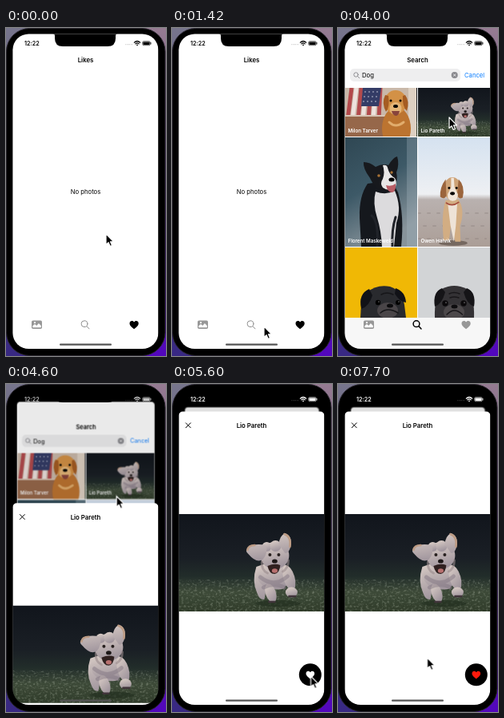
An HTML page for the animation above (8000 ms loop, 200 by 411 pixels).

```html
<!DOCTYPE html>
<html lang="en">
<head>
<meta charset="utf-8">
<title>Photo likes</title>
<style>
html, body { margin: 0; width: 100%; height: 100%; overflow: hidden; background: #000; }
svg { display: block; width: 100vw; height: 100vh; }
text { font-family: Inter, Roboto, sans-serif; font-size: 7.7px; }
.title { font-weight: 600; font-size: 7.8px; text-anchor: middle; }
.name { font-weight: 600; font-size: 6.2px; fill: #fff; }
.line { fill: none; stroke-linecap: round; }

.likes, .search, .heart, .status, .rear, .dim, .sheet, .cx, .cy { animation: 8s infinite; }
.likes { animation-name: likes; animation-timing-function: step-end; }
.search { animation-name: search; animation-timing-function: step-end; }
.heart { animation-name: heart; animation-timing-function: step-end; }
.status { animation-name: status; }
.rear, .dim, .sheet { animation-timing-function: cubic-bezier(.32, .72, 0, 1); }
.rear { animation-name: rear; }
.dim { animation-name: dim; }
.sheet { animation-name: sheet; }
.cx, .cy { animation-timing-function: ease-in-out; }
.cx { animation-name: cx; }
.cy { animation-name: cy; }

@keyframes likes { 0% { opacity: 1 } 35%, 100% { opacity: 0 } }
@keyframes search { 0% { opacity: 0 } 35%, 100% { opacity: 1 } }
@keyframes heart { 0% { fill: #fff } 72.75%, 100% { fill: #ff1a0c } }
@keyframes status { 0%, 56.25% { color: #000 } 59%, 100% { color: #fff } }
@keyframes rear {
  0%, 56.25% { transform: translate(0, 0) scale(1) }
  62.25%, 100% { transform: translate(8.5px, 22.5px) scale(.92) }
}
@keyframes dim { 0%, 56.25% { opacity: 0 } 62.25%, 100% { opacity: .12 } }
@keyframes sheet {
  0%, 56.25% { transform: translateY(368px) }
  62.25%, 100% { transform: translateY(0) }
}
/* Horizontal and vertical pointer travel turn at different times, which bends the path. */
@keyframes cx {
  0% { transform: translateX(125px) }
  3% { transform: translateX(138px) }
  10.25%, 12.5% { transform: translateX(84px) }
  17%, 17.75% { transform: translateX(115px) }
  22%, 24.75% { transform: translateX(104px) }
  25.5%, 31.25% { transform: translateX(101px) }
  32.5%, 35% { transform: translateX(99.5px) }
  45%, 56.25% { transform: translateX(139px) }
  59.75% { transform: translateX(136px) }
  66.25% { transform: translateX(170px) }
  70%, 72.75% { transform: translateX(173.5px) }
  76.5%, 79.25% { transform: translateX(107px) }
  82.5% { transform: translateX(50px) }
  86% { transform: translateX(172px) }
  89.25% { transform: translateX(113px) }
  92.75% { transform: translateX(84px) }
  96.25%, 100% { transform: translateX(111.5px) }
}
@keyframes cy {
  0% { transform: translateY(258px) }
  4% { transform: translateY(353px) }
  10.25%, 12.5% { transform: translateY(217px) }
  17.5%, 31.25% { transform: translateY(374px) }
  32.5%, 35% { transform: translateY(372px) }
  45% { transform: translateY(112px) }
  56.25% { transform: translateY(112px); animation-timing-function: ease-in }
  59.75% { transform: translateY(271px); animation-timing-function: ease-out }
  66.25% { transform: translateY(363px) }
  70%, 72.75% { transform: translateY(366px) }
  76.5%, 79.25% { transform: translateY(230px) }
  81% { transform: translateY(194px) }
  85.75% { transform: translateY(363px) }
  89.5% { transform: translateY(204px) }
  94.5% { transform: translateY(350px) }
  96.25%, 100% { transform: translateY(343px) }
}
</style>
</head>
<body>
<svg viewBox="0 0 200 411" preserveAspectRatio="none">
<defs>
  <linearGradient id="deskLeft" x2="0" y2="1">
    <stop offset="0" stop-color="#77758c"/><stop offset=".5" stop-color="#4b4377"/><stop offset="1" stop-color="#382883"/>
  </linearGradient>
  <linearGradient id="deskRight" x2="0" y2="1">
    <stop offset="0" stop-color="#957b92"/><stop offset=".5" stop-color="#5f437c"/><stop offset="1" stop-color="#5206bd"/>
  </linearGradient>
  <linearGradient id="dusk" x2="0" y2="1">
    <stop offset="0" stop-color="#11151c"/><stop offset=".45" stop-color="#1a1f25"/>
    <stop offset=".64" stop-color="#222d2a"/><stop offset=".8" stop-color="#3d4a38"/><stop offset="1" stop-color="#303c2a"/>
  </linearGradient>
  <linearGradient id="fur" x2=".3" y2="1">
    <stop offset="0" stop-color="#dfd2ca"/><stop offset="1" stop-color="#a0959d"/>
  </linearGradient>
  <linearGradient id="street" x2=".4" y2="1">
    <stop offset="0" stop-color="#2f4753"/><stop offset=".5" stop-color="#3d5967"/><stop offset="1" stop-color="#87939a"/>
  </linearGradient>
  <linearGradient id="beach" x2="0" y2="1">
    <stop offset="0" stop-color="#d5e2f0"/><stop offset=".52" stop-color="#eef0f3"/>
    <stop offset=".57" stop-color="#b9b1af"/><stop offset="1" stop-color="#ab9e97"/>
  </linearGradient>
  <filter id="soft"><feGaussianBlur stdDeviation=".5"/></filter>
  <filter id="grass" x="0" y="0" width="1" height="1">
    <feTurbulence type="fractalNoise" baseFrequency=".3 .4" numOctaves="2" seed="4"/>
    <feColorMatrix values="0 0 0 0 .62  0 0 0 0 .68  0 0 0 0 .56  3 0 0 0 -1.5"/>
  </filter>
  <clipPath id="screen"><rect x="8.400" y="7.400" width="182" height="394.600" rx="20"/></clipPath>
  <clipPath id="card"><rect x="8" y="7" width="182.500" height="395" rx="5"/></clipPath>
  <clipPath id="grid"><path d="M9 75h90v61H9zM100 75h90v61h-90zM9 137h90v137H9zM100 137h90v137h-90zM9 275h90v88H9zM100 275h90v88h-90z"/></clipPath>
  <path id="love" d="M0 3.2C0 1.2 1.4 0 3 0 4.2 0 5 .7 5.6 1.6 6.2 .7 7 0 8.2 0 9.8 0 11.2 1.2 11.2 3.2 11.2 6 8 8.3 5.6 10.2 3.2 8.3 0 6 0 3.2Z"/>
  <g id="lens" class="line" stroke="currentColor"><circle cx="98" cy="370.7" r="3.9"/><path d="M101 373.7l3 3.2"/></g>
  <g id="gallery">
    <rect x="32" y="366.5" width="13" height="10.5" rx="1.8" fill="#989898"/>
    <path d="M33.3 375.3v-2l2.7-2.4 2.3 2 2.6-2.8 2.9 3v2.2z" fill="#fff"/>
    <circle cx="36" cy="369.2" r="1.1" fill="#fff"/>
  </g>

  <g id="runner">
    <rect width="182" height="122" fill="url(#dusk)"/>
    <rect y="82" width="182" height="40" filter="url(#grass)" opacity=".3"/>
    <g filter="url(#soft)">
      <ellipse cx="124" cy="112" rx="28" ry="4" fill="#232f20" opacity=".7"/>
      <g fill="url(#fur)">
        <path d="M97 66q-6 18 1 33 3 9 9 8l3-16q12 6 22 2l5-22-14-14z"/>
        <ellipse cx="120" cy="77" rx="22" ry="17"/>
        <ellipse cx="138" cy="80" rx="7" ry="16" transform="rotate(-16 138 80)"/>
        <ellipse cx="115" cy="99" rx="6.500" ry="12" transform="rotate(-18 115 99)"/>
        <ellipse cx="141" cy="98" rx="7.500" ry="6.500"/>
        <ellipse cx="120" cy="52" rx="18" ry="17"/>
        <circle cx="110" cy="41" r="6"/><circle cx="121" cy="40" r="7"/>
        <path d="M109 39q-13-3-22 2-5 5 0 9 10 12 18 7 7-8 4-18zM125 38q1-11 8-14 9 3 7 16-2 9-7 9z"/>
      </g>
      <path d="M86 45q1-6 9-6M132 25q9 3 7 16" class="line" stroke="#bd9c85" stroke-width="2.500"/>
      <path d="M102 79q17 14 34-1M106 92q14-7 26 0" class="line" stroke="#837884" stroke-width="5" opacity=".5"/>
      <path d="M104 60q-1 10 7 14M137 58q0 10-7 14" class="line" stroke="#998a8d" stroke-width="3" opacity=".6"/>
      <circle cx="114" cy="51" r="2" fill="#27201f"/><circle cx="125" cy="51" r="2" fill="#27201f"/>
      <path d="M111 65q9-4 16-1-1 10-7 11-7 0-9-10z" fill="#302120"/>
      <ellipse cx="120" cy="71" rx="3.600" ry="2.800" fill="#b8706f"/>
      <ellipse cx="120" cy="59" rx="3.400" ry="2.600" fill="#1c1717"/>
      <path d="M113 110h7M138 103h8" class="line" stroke="#40343a" stroke-width="2.500"/>
    </g>
  </g>

  <g id="retriever">
    <path d="M9 75h90v61H9z" fill="#c9b8a9"/>
    <path d="M17 75l-5 40M29 75l-4 40M41 75l-3 40M53 75l-2 40" stroke="#b34a4c" stroke-width="5"/>
    <path d="M23 75l-5 40M35 75l-4 40M47 75l-3 40" stroke="#eee2dd" stroke-width="5"/>
    <path d="M31 75h23l-3 23H29z" fill="#343c66"/>
    <path d="M34 80h17M33 86h17M32 92h17" class="line" stroke="#dcdce8" stroke-width="1.500" stroke-dasharray="0 5"/>
    <path d="M9 109h50v27H9z" fill="#96674a"/><path d="M9 110h50" stroke="#d8c5b6" stroke-width="2"/>
    <path d="M88 75h11v61H88z" fill="#ddd0c2"/>
    <g transform="translate(-10)">
      <ellipse cx="83" cy="126" rx="18" ry="27" fill="#bc7430"/>
      <ellipse cx="82" cy="93" rx="14" ry="15" fill="#d39146"/>
      <path d="M69 84q-5 10 1 21 5-6 3-20zM94 84q6 8 2 20-6-6-5-19z" fill="#a55c22"/>
      <ellipse cx="82" cy="101" rx="7.500" ry="8" fill="#e4b577"/>
      <circle cx="76" cy="91" r="1.500"/><circle cx="88" cy="91" r="1.500"/><ellipse cx="82" cy="98" rx="3" ry="2"/>
      <path d="M77 104h10q-1 6-5 6-4-1-5-6z" fill="#88443c"/>
      <path d="M74 118q8 8 18 0" class="line" stroke="#e1ad6d" stroke-width="3"/>
    </g>
  </g>

  <g id="collie">
    <path d="M9 137h90v137H9z" fill="url(#street)"/>
    <path d="M86 137h13v137H86z" fill="#a9bac2" opacity=".3"/>
    <path d="M37 195q-11 16-10 43l2 36h50q4-39-4-68l-8-15z" fill="#15181d"/>
    <path d="M47 205q13 5 24-1 9 21 2 40l-3 30H55q-1-20-6-36-6-19-2-33z" fill="#dcdbdd"/>
    <path d="M40 188q-9-12-8-20 8 0 15 6 9-5 16-2 6-10 11-11 3 10-1 20 3 15-7 22-17 5-26-15z" fill="#17191d"/>
    <path d="M56 172q5-1 6 3 2 9 9 13 3 5 1 11-8 7-16 1-4-5 0-11 3-8 0-17z" fill="#e8e7e7"/>
    <circle cx="51" cy="185" r="1.800" fill="#a77235"/><circle cx="67" cy="181" r="1.700" fill="#a77235"/>
    <ellipse cx="67" cy="190" rx="3.600" ry="2.500"/>
    <path d="M60 197q7 2 12-2 1 9-4 11-6 0-8-9z" fill="#b85d65"/>
    <path d="M42 235q9 7 7 39M72 237q-5 15-4 37" class="line" stroke="#202329" stroke-width="3"/>
  </g>

  <g id="puppy">
    <path d="M100 137h90v137h-90z" fill="url(#beach)"/>
    <path d="M100 232h90M107 248h80M100 264h85" class="line" stroke="#877d78" stroke-width="2" stroke-dasharray="3 9" opacity=".35"/>
    <g transform="translate(20.700 45) scale(.85)">
      <ellipse cx="145" cy="264" rx="21" ry="4" fill="#756860"/>
      <path d="M134 201q-7 20-3 59h8l3-25 6 27h8l-1-23q8-23-2-39z" fill="#d2ad83"/>
      <path d="M137 205q8 6 14 0l-2 33-3 24-5-24z" fill="#eee3d7"/>
      <ellipse cx="144" cy="184" rx="13" ry="17" fill="#cda276"/>
      <path d="M134 170q-9 12-8 26 6 5 9-2zM153 170q10 10 6 27-6 4-8-5z" fill="#9b653d"/>
      <path d="M142 168h4l1 14 5 10q0 10-8 10-8-1-7-10l5-10z" fill="#f1e6da"/>
      <circle cx="139" cy="183" r="1.700"/><circle cx="150" cy="183" r="1.700"/><ellipse cx="144" cy="191" rx="3.400" ry="2.500"/>
      <path d="M135 205q9 6 18-1" class="line" stroke="#a44b3c" stroke-width="2"/>
    </g>
  </g>

  <g id="pugs">
    <path d="M9 275h90v88H9z" fill="#f0b805"/>
    <path d="M28 363q0-21 9-32 11-10 28-7 15 5 18 23l2 16z" fill="#292a2e"/>
    <path d="M39 327q-14 6-10 25 10-3 14-17zM72 326q12 4 13 18-8-1-14-11z" fill="#111217"/>
    <ellipse cx="62" cy="354" rx="13" ry="10" fill="#494548"/>
    <ellipse cx="65" cy="348" rx="4" ry="2.500" fill="#0b0b0d"/>
    <circle cx="50" cy="344" r="3.200"/><circle cx="75" cy="344" r="3"/><path d="M51 343h0M76 343h0" class="line" stroke="#fff"/>
    <path d="M53 357q9-8 22 0M54 334q7-4 15 0" class="line" stroke="#161619" stroke-width="1.500"/>
    <path d="M100 275h90v88h-90z" fill="#d2d4d6"/>
    <path d="M121 363q-1-26 9-36 15-8 31 0 10 10 9 36z" fill="#343235"/>
    <path d="M130 326q-12 5-9 23 9-3 13-18zM161 326q12 5 9 23-9-3-13-18z" fill="#151417"/>
    <ellipse cx="145" cy="356" rx="13" ry="10" fill="#4c484a"/>
    <circle cx="134" cy="345" r="3.700" fill="#0b090b"/><circle cx="157" cy="345" r="3.700" fill="#0b090b"/>
    <path d="M135 344h0M158 344h0" class="line" stroke="#fff" stroke-width="1.100"/>
    <ellipse cx="145.500" cy="349" rx="4" ry="2.500" fill="#0d0c0e"/>
    <path d="M136 359q5-5 9.500-5 5 0 10 5M139 333q6-3 13 0M140 338q5-2 11 0" class="line" stroke="#19171a" stroke-width="1.400"/>
  </g>
</defs>

<rect width="100" height="411" fill="url(#deskLeft)"/>
<rect x="100" width="100" height="411" fill="url(#deskRight)"/>
<rect x=".5" y=".5" width="198.500" height="410" rx="29" stroke="#29262e"/>

<g clip-path="url(#screen)">
  <g class="rear"><g clip-path="url(#card)">
    <rect x="8" y="7" width="183" height="395" fill="#fff"/>
    <g class="likes">
      <text class="title" x="99.500" y="43">Likes</text>
      <text x="99.500" y="207.700" text-anchor="middle">No photos</text>
      <use href="#gallery"/>
      <use href="#lens" color="#8e8e8e"/>
      <use href="#love" x="154.500" y="367"/>
    </g>
    <g class="search">
      <text class="title" x="99.500" y="43">Search</text>
      <rect x="15" y="51" width="138" height="16" rx="5" fill="#eeeeef"/>
      <g class="line" stroke="#85858a" stroke-width=".9"><circle cx="22.500" cy="58.500" r="2.700"/><path d="M24.500 60.500l2.200 2.200"/></g>
      <text x="30" y="62">Dog</text>
      <circle cx="145.700" cy="59" r="4" fill="#88888d"/>
      <path d="M144.200 57.500l3 3m0-3l-3 3" stroke="#fff" stroke-width=".8"/>
      <text x="158" y="61.700" fill="#087cff">Cancel</text>
      <g clip-path="url(#grid)">
        <g filter="url(#soft)">
          <use href="#retriever"/><use href="#collie"/><use href="#puppy"/><use href="#pugs"/>
        </g>
        <use href="#runner" transform="translate(98 74.500) scale(.51)"/>
        <text class="name" x="12.500" y="130.700">Milon Tarver</text>
        <text class="name" x="103.500" y="130.700">Lio Pareth</text>
        <text class="name" x="12.500" y="268.700">Florent Maskeweld</text>
        <text class="name" x="103.500" y="268.700">Owen Halvik</text>
      </g>
      <rect x="8" y="363" width="183" height="39" fill="#f7f7f7"/>
      <use href="#gallery"/>
      <use href="#lens" color="#000" stroke-width="1.500"/>
      <use href="#love" x="154.500" y="367" fill="#989898"/>
    </g>
    <rect class="dim" x="8" y="7" width="183" height="395"/>
  </g></g>

  <g class="sheet">
    <rect x="8.400" y="34.500" width="182" height="380" rx="5" fill="#fff"/>
    <path d="M17.300 48.800l6 6m0-6l-6 6" class="line" stroke="#000"/>
    <text class="title" x="99.500" y="54.800">Lio Pareth</text>
    <use href="#runner" x="8.400" y="163"/>
    <circle cx="172.800" cy="364.300" r="14"/>
    <use class="heart" href="#love" transform="translate(167.500 359.800) scale(.95)"/>
  </g>

  <rect x="67" y="395.600" width="65" height="2.200" rx="1.100" fill="#555"/>
  <path d="M58 7q3 0 3 3v3q0 10 10 10h56q10 0 10-10v-3q0-3 3-3z"/>
  <g class="status" fill="currentColor" stroke="currentColor" stroke-width="0">
    <text x="23" y="22" font-weight="600" style="font-size:7.200px">12:22</text>
    <path d="M150 20.700h8" class="line" stroke-width="1" stroke-dasharray="0 2.400" opacity=".4"/>
    <path d="M160.300 18.200q3.700-3.400 7.400 0M161.800 19.900q2.200-2 4.400 0" class="line" stroke-width="1.200"/>
    <circle cx="164" cy="21.300" r=".9"/>
    <rect x="170.700" y="16.700" width="9.600" height="5" rx="1.500" fill="none" stroke-width=".6"/>
    <rect x="171.400" y="17.400" width="8.200" height="3.600" rx=".8"/>
    <path d="M181 18.300v1.800" class="line" stroke-width=".8"/>
  </g>
</g>

<g class="cx"><g class="cy">
  <path d="M0 0V13.500L3.100 10.700 5.200 15.500 7.500 14.500 5.500 9.800H9.600Z" stroke="#fff" stroke-width="1.200" stroke-linejoin="round"/>
</g></g>
</svg>
</body>
</html>
```
